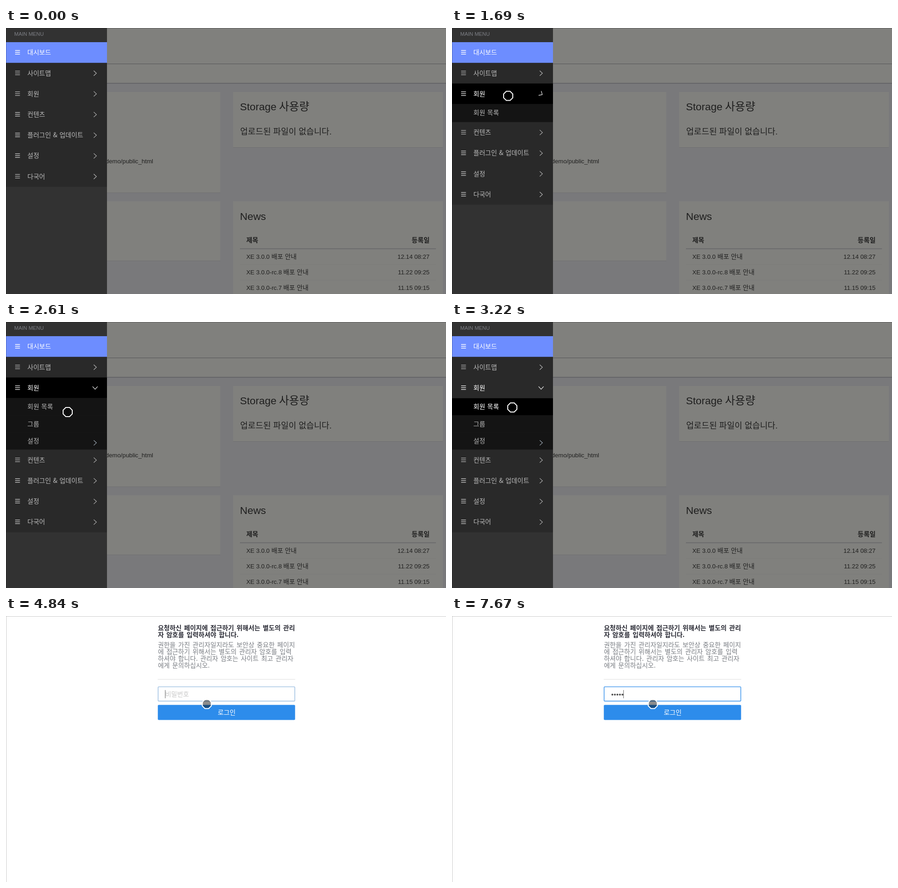
An HTML page that plays this animation: 963 px wide and 582 px high, repeating every 8 s.

```html
<!DOCTYPE html>
<html lang="ko">
<head>
<meta charset="utf-8">
<style>
html, body { margin: 0; width: 100%; height: 100%; overflow: hidden; background: #fff }
svg { display: block; width: 963px; height: 582px }
text { font-family: "Noto Sans CJK KR", "Noto Sans", sans-serif; white-space: pre }
.latin { font-family: "Liberation Sans", Arial, "Noto Sans CJK KR", sans-serif }
</style>
</head>
<body>
<svg id="stage" viewBox="0 0 963 582"></svg>
<script>
const LOOP = 8000, ROW = 45.2, SUB = 37.6, MENU_TOP = 31;
const stage = document.getElementById('stage');

const clamp = v => Math.max(0, Math.min(1, v));
const span = (t, a, b) => clamp((t - a) / (b - a));
const smooth = v => v * v * (3 - 2 * v);
const mix = (a, b, v) => a + (b - a) * v;
const gray = v => `rgb(${v},${v},${v})`;

const rect = (x, y, w, h, fill, extra = '') =>
  `<rect x="${x}" y="${y}" width="${w}" height="${h}" fill="${fill}" ${extra}/>`;
const line = (d, color, width = 1) =>
  `<path d="${d}" fill="none" stroke="${color}" stroke-width="${width}"/>`;
// y is the middle of the glyphs; the baseline sits on a whole pixel
const text = (s, x, y, size, fill, extra = '') =>
  `<text x="${x}" y="${Math.round(y + size * .365)}" font-size="${size}" fill="${fill}" ${extra}>${s}</text>`;
const latin = (s, x, y, size, fill, extra = '') => text(s, x, y, size, fill, `class="latin" ${extra}`);

const END = 'text-anchor="end"';
const BOLD = 'font-weight="700"';
const LIGHT = 'font-weight="300"';

// ---- dimmed dashboard ----
const INK = '#1f1f1f';
const card = (x, y, w, h) => rect(x, y + 1, w, h, '#6f6f71') + rect(x, y, w, h, '#80807d');

function newsRow(version, hangulX, date, y) {
  return latin(version, 526, y, 13.3, INK) +
    latin('배포 안내', hangulX, y, 13.9, INK, LIGHT) +
    latin(date, 927, y, 13.3, INK, END) +
    rect(512, y + 17, 429, 1, '#7b7b79');
}

const dashboard = rect(0, 0, 963, 582, '#79797b') +
  rect(0, 0, 963, 121, '#80807d') +
  rect(0, 78, 963, 1, '#555557') + rect(0, 120, 963, 2, '#656568') +
  card(200, 140, 269, 220) + card(200, 379, 269, 130) +
  card(497, 140, 459, 121) + card(497, 379, 459, 210) +
  latin('demo/public_html', 322, 291, 13.3, INK, END) +
  latin('Storage', 512, 172, 22.8, INK) +
  text('사용량', 597.5, 171, 24, INK, LIGHT) +
  latin('업로드된 파일이 없습니다.', 512.5, 226, 18.3, INK, LIGHT) +
  latin('News', 512, 411.5, 22.8, INK) +
  text('제목', 526, 464, 14.2, INK, BOLD) +
  text('등록일', 927, 464, 14.2, INK, BOLD + END) +
  rect(512, 482, 429, 2, '#6c6c6d') +
  newsRow('XE 3.0.0', 581, '12.14 08:27', 500) +
  newsRow('XE 3.0.0-rc.8', 607, '11.22 09:25', 534) +
  newsRow('XE 3.0.0-rc.7', 607, '11.15 09:15', 568);

// ---- side menu ----
const ITEMS = ['대시보드', '사이트맵', '회원', '컨텐츠', '플러그인 &amp; 업데이트', '설정', '다국어'];
const SUBITEMS = ['회원 목록', '그룹', '설정'];

const burger = (y, color) =>
  line([-4, 0, 4].map(d => `M20 ${y + d}h10.5`).join(''), color, 1.4);
const chevron = (y, color, turn = 0) =>
  `<path d="M-3 -5.5L3 0L-3 5.5" transform="translate(195 ${y}) rotate(${turn * 90})" fill="none" stroke="${color}" stroke-width="1.1"/>`;
const label = (s, y, color, weight = 400) =>
  text(s, 46.7, y, 14.1, color, `font-weight="${weight}" word-spacing=".5"`);

function submenu(open, hover) {
  const top = MENU_TOP + 3 * ROW, height = 3 * SUB * open;
  const rows = SUBITEMS.map((s, i) => {
    const y = top + SUB * i, on = i ? 0 : hover;
    return rect(0, y, 221, SUB, gray(mix(20, 0, on))) +
      label(s, y + SUB / 2 - .3, gray(mix(180, 255, on)), on > .5 ? 500 : 400);
  }).join('');
  return `<clipPath id="fold">${rect(0, top, 221, height, '#000')}</clipPath>
    <g clip-path="url(#fold)">${rows}${chevron(264.3, '#a8b4c0')}</g>`;
}

function menu(t) {
  const open = smooth(span(t, 1540, 1920));
  const pick = span(t, 1540, 1640);
  const move = t < 3090 ? 0 : t < 3220 ? .5 : 1;
  let out = rect(0, 0, 221, 582, '#323232') +
    latin('MAIN MENU', 18, 13, 11.3, '#7f8187') +
    rect(0, MENU_TOP, 221, 7 * ROW + 3 * SUB * open, '#292929');
  ITEMS.forEach((s, i) => {
    const top = MENU_TOP + ROW * i + (i > 2 ? 3 * SUB * open : 0);
    const y = top + ROW / 2 - .4;
    const member = i === 2, lit = member ? pick : 0;
    const color = i ? gray(mix(185, 255, lit)) : '#fff';
    if (!i) out += rect(0, top, 221, ROW, '#6d8dff');
    if (member) out += rect(0, top, 221, ROW, gray(mix(41, 0, pick * (1 - move))));
    out += burger(y, color) + label(s, y, color, lit > .5 ? 500 : 400);
    if (i) out += chevron(y + .6, color, member ? open : 0);
  });
  return out + (open ? submenu(open, move) : '');
}

// ---- password page ----
const para = (lines, y, color, extra = '') => lines.map((s, i) =>
  text(s, 332.4, y + 15 * i, 14.1, color, `word-spacing="1.6" ${extra}`)).join('');

const loginPage = rect(0, 0, 963, 582, '#fff') +
  para(['요청하신 페이지에 접근하기 위해서는 별도의 관리', '자 암호를 입력하셔야 합니다.'], 25.5, '#2a2b35', BOLD) +
  para(['권한을 가진 관리자일지라도 보안상 중요한 페이지', '에 접근하기 위해서는 별도의 관리자 암호를 입력',
    '하셔야 합니다. 관리자 암호는 사이트 최고 관리자', '에게 문의하십시오.'], 63, '#787c82') +
  rect(332, 138, 301, 1, '#dfdfdf') +
  rect(332.3, 194.4, 300.4, 33.2, '#2d8ceb', 'rx="2"') +
  text('로그인', 483, 211, 14.1, '#fff', 'text-anchor="middle"');

function typed(t) {
  if (t < 5580) return 0;
  if (t < 6190) return Math.min(6, 1 + Math.floor((t - 5580) / 86));
  if (t < 7180) return Math.min(11, 7 + Math.floor((t - 6190) / 70));
  return Math.min(5, Math.floor((t - 7180) / 98));
}

function field(t) {
  const focus = span(t, 4780, 4940), n = typed(t), left = 348, pitch = 5.5;
  const selected = t >= 7080 && t < 7180;
  const caret = t >= 4820 && !(t >= 5320 && t < 5580) && !(t >= 6980 && t < 7180);
  const border = `rgb(${mix(216, 45, focus)},${mix(216, 140, focus)},${mix(216, 235, focus)})`;
  let out = rect(332.9, 154.9, 299.2, 31.4, '#fff', `rx="1.5" stroke="${border}" stroke-width="1.4"`);
  if (selected) out += rect(left, 162, 61, 18, '#3390ff');
  if (!n) out += text('비밀번호', 348.6, 171, 14.1, '#c6c6c6');
  for (let i = 0; i < n; i++)
    out += `<circle cx="${left + pitch * (i + .55)}" cy="172" r="2.1" fill="${selected ? '#fff' : '#505050'}"/>`;
  return out + (caret ? rect(Math.round(left + pitch * n - .1), 162, 1, 18, '#666') : '');
}

// ---- pointer ----
// [start, end, x, y]: arrives at x, y between the two times
const MOVES = [
  [0, 0, 847, 556], [80, 770, 131, 154.5], [880, 1050, 123, 149], [1229, 1230, 123, 148.5],
  [2220, 2610, 135, 197], [2780, 2890, 132, 187], [4110, 4430, 415, 192], [4550, 4780, 439.5, 192.5]
];

function pointer(t) {
  if (t < 80) return '';
  let x = 0, y = 0;
  for (const [a, b, toX, toY] of MOVES) {
    if (t < a) break;
    const v = b > a ? smooth(span(t, a, b)) : 1;
    x = mix(x, toX, v);
    y = mix(y, toY, v);
  }
  const k = 4.1;
  return `<g transform="translate(${x} ${y})"><circle r="9.2" fill="#000" fill-opacity=".45"/>
    <path d="M${-k} -10H${k}L10 ${-k}V${k}L${k} 10H${-k}L-10 ${k}V${-k}Z" fill="none" stroke="#fff" stroke-width="2"/></g>`;
}

function render(t) {
  const login = t >= 3640;
  const edge = login ? '#c8c8c8' : 'rgba(0,0,0,.25)';
  stage.innerHTML = (login ? loginPage + field(t) : dashboard + menu(t)) +
    rect(0, 0, 963, 1, edge) + rect(0, 1, 1, 581, edge) + pointer(t);
}

const start = performance.now();
function tick() {
  render((performance.now() - start) % LOOP);
  requestAnimationFrame(tick);
}
tick();
</script>
</body>
</html>
```
